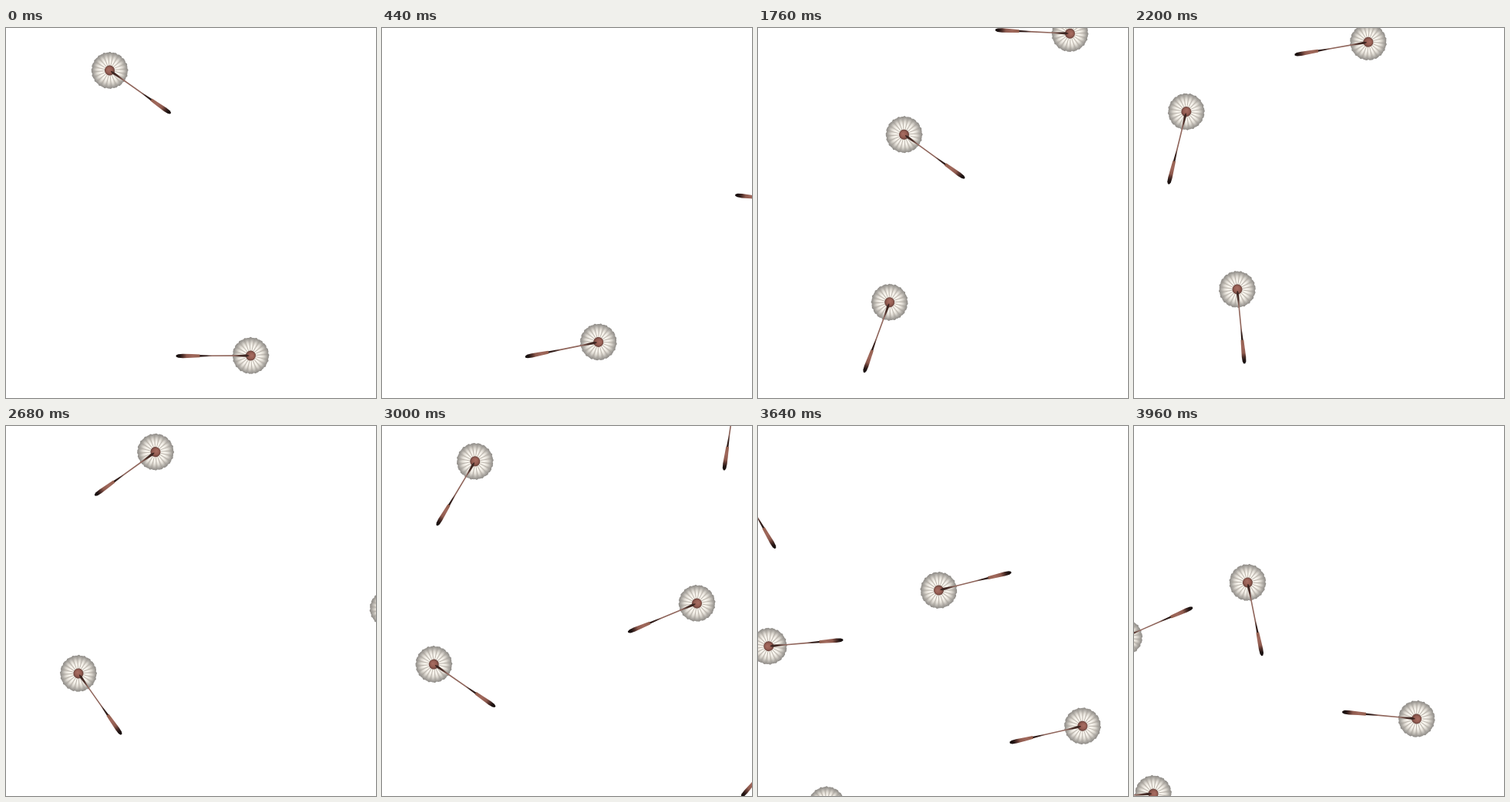
Recreate the animation shown at these times as an HTML page with a canvas. Size 480 by 480 pixels, loop 4000 ms.

```html
<!DOCTYPE html>
<html lang="en">
<head>
<meta charset="utf-8">
<title>Drifting seeds</title>
<style>
html, body { margin: 0; width: 100%; height: 100%; overflow: hidden; background: #fff; }
canvas { display: block; width: 100vw; height: 100vh; }
</style>
</head>
<body>
<canvas id="stage" width="480" height="480"></canvas>
<script>
const ctx = document.getElementById('stage').getContext('2d');
const LOOP = 4, STEP = 0.04, SWING = 2.32, TAU = Math.PI * 2;

// A seed passes (x, y) at time t, drifting steadily while its stem swings around
// the given angle. Units: seconds, pixels, degrees; spin is the fastest turn.
const seed = (t, x, y, vx, vy, angle, spin, lift = 0) => now => {
  const d = now - t;
  return {
    x: x + vx * d,
    y: y + vy * d + lift * d * d,
    angle: angle + spin * SWING * Math.sin(d / SWING)
  };
};

const seeds = [
  seed(0, 134.5, 55, -400, 30, 35.2, 200),
  seed(2.9, 75.6, 312.8, -83.4, -37.1, 41, -63, 0.55),
  seed(1.3, 316.7, 169.3, -276.5, -67.5, -38, 161.5),
  seed(1.12, 507.5, 7, -200, -70, 180.6, 50),
  seed(5.124, -365.7, 166.4, -229, 72.9, -125, -133.6, 7.6),
  seed(3.32, 321.5, 222, -272, -26.5, 251.7, 296, -4.9),
  seed(3.32, 394, -48, -200, -30, 124, 80),
  seed(3.64, 421, 389.2, -170, -28.9, 167.1, 57.3),
  seed(3.96, 25, 477, -200, -45, 176, 47)
];

// Colours as [position, colour] pairs
function shade(gradient, ...stops) {
  stops.forEach(([at, color]) => gradient.addColorStop(at, color));
  return gradient;
}
const radial = (r, ...stops) => shade(ctx.createRadialGradient(0, 0, 0, 0, 0, r), ...stops);
const along = (from, to, ...stops) => shade(ctx.createLinearGradient(from, 0, to, 0), ...stops);

const fluff = radial(24, [0, '#d9d0c6'], [0.35, '#f3efe8'], [0.5, '#efebe4'],
  [0.68, '#d6d1c9'], [0.85, '#aeaaa4'], [1, '#8b8884']);
const vein = radial(23, [0.25, 'rgba(120,108,96,.45)'], [0.6, 'rgba(125,116,106,.4)'], [1, 'rgba(110,105,100,.1)']);
const ray = radial(23, [0.3, 'rgba(255,252,245,.6)'], [0.6, 'rgba(255,252,245,.55)'], [0.95, 'rgba(255,252,245,0)']);
const hub = shade(ctx.createRadialGradient(-2, 0, 0, 0, 0, 6.6),
  [0, '#a96f64'], [0.6, '#965e53'], [1, '#66403a']);
const stem = along(0, 67, [0, '#33201c'], [0.2, '#4a2f29'], [0.33, '#936a60'],
  [0.75, '#8d6258'], [0.85, '#38221e'], [1, '#2a1917']);
const handle = along(66, 97, [0, '#94604f'], [0.3, '#a0685c'], [0.55, '#8e5a4e'],
  [0.72, '#4a2c27'], [0.84, '#201413'], [1, '#140c0b']);

// Symmetric shape along the x axis from [x, half width] pairs
function spindle(profile, fill) {
  ctx.beginPath();
  profile.forEach(([x, w]) => ctx.lineTo(x, w));
  [...profile].reverse().forEach(([x, w]) => ctx.lineTo(x, -w));
  ctx.closePath();
  ctx.fillStyle = fill;
  ctx.fill();
}

function drawHead() {
  ctx.beginPath();
  for (let i = 0; i < 120; i++) {
    const a = i / 120 * TAU;
    const r = 23.5 + 0.4 * Math.cos(a * 20) + 0.3 * Math.sin(a * 37);
    ctx.lineTo(r * Math.cos(a), r * Math.sin(a));
  }
  ctx.closePath();
  ctx.fillStyle = fluff;
  ctx.fill();
  for (let i = 0; i < 40; i++) {
    const a = (i + 0.5) / 40 * TAU, c = Math.cos(a), s = Math.sin(a);
    ctx.beginPath();
    ctx.moveTo(6 * c, 6 * s);
    ctx.lineTo(22.5 * c, 22.5 * s);
    ctx.lineWidth = i % 2 ? 1 : 1.6;
    ctx.strokeStyle = i % 2 ? vein : ray;
    ctx.stroke();
  }
  ctx.beginPath();
  ctx.arc(0, 0, 6.5, 0, TAU);
  ctx.fillStyle = hub;
  ctx.fill();
}

function drawSeed({ x, y, angle }) {
  ctx.save();
  ctx.translate(x, y);
  ctx.rotate(angle * TAU / 360);
  drawHead();
  spindle([[2, 0.4], [6, 1.6], [20, 0.8], [54, 0.8], [67, 1.3]], stem);
  spindle([[66, 1.9], [76, 2.3], [88, 2.7], [94, 2.3], [96.8, 1]], handle);
  ctx.restore();
}

const start = performance.now();

function frame() {
  const elapsed = Math.max(0, performance.now() - start) / 1000;
  const now = Math.floor(elapsed % LOOP / STEP + 1e-6) * STEP;
  ctx.fillStyle = '#fff';
  ctx.fillRect(0, 0, 480, 480);
  seeds.forEach(at => drawSeed(at(now)));
  requestAnimationFrame(frame);
}
frame();
</script>
</body>
</html>
```
